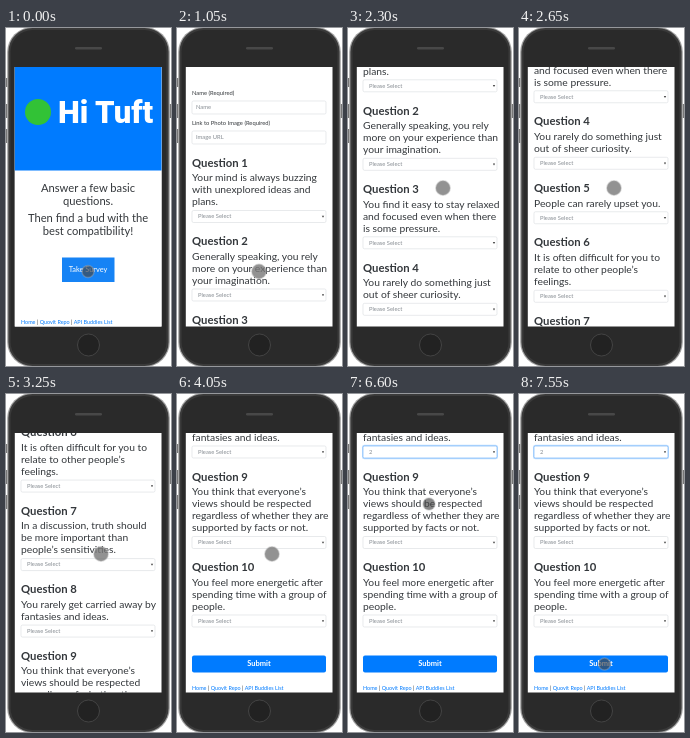
Write an HTML page that moves like this. It is 165x338 px and loops after 8000 ms.

```html
<!DOCTYPE html>
<html lang="en">
<head>
<meta charset="utf-8">
<style>
  html, body { margin: 0; width: 100%; height: 100%; overflow: hidden; background: #fff; }
  svg { display: block; width: 100vw; height: 100vh; font-family: "Lato", sans-serif; }
</style>
</head>
<body>
<svg viewBox="0 0 165 338">
  <defs>
    <clipPath id="screen"><rect x="8.8" y="39" width="146.7" height="259.5"/></clipPath>
  </defs>
  <path d="M.7 50v9M.7 76v14M.7 101v14M164.3 76v14" stroke="#777" stroke-width="1.4"/>
  <rect x="1.2" y="-1" width="162.6" height="340" rx="25" fill="#a0a0a0"/>
  <rect x="2.4" y="0" width="160.2" height="338" rx="24" fill="#3a3a3a"/>
  <rect x="4.5" y="2" width="156" height="334" rx="22" fill="#2a2a2a"/>
  <rect x="69" y="19" width="27" height="2.4" rx="1.2" fill="#484848"/>
  <circle cx="82.5" cy="317" r="11" fill="#222" stroke="#4c4c4c" stroke-width=".8"/>
  <g clip-path="url(#screen)">
    <rect x="8" y="39" width="149" height="260" fill="#fff"/>
    <g id="form"></g>
    <g id="cover"></g>
    <circle id="cursor" stroke="#aaa" stroke-opacity=".4" stroke-width="1.5"/>
  </g>
</svg>
<script>
const LOOP = 8000, BLUE = "#007bff", INK = "#34383c", GRAY = "#858b91";
const $ = id => document.getElementById(id);

const text = (x, mid, size, str, attrs = "") =>
  `<text x="${x}" y="${mid + size * .33}" font-size="${size}" fill="${INK}" ${attrs}>${str}</text>`;
const box = (y, h, attrs = "") =>
  `<rect x="15" y="${y - h / 2}" width="134" height="${h}" rx="1.5" fill="#fff" stroke="#d8dce0" stroke-width=".6" ${attrs}/>`;
const hint = `style="fill:${GRAY}"`;
const centered = 'text-anchor="middle"';
const white = centered + ' style="fill:#fff"';
const links = y => text(15, y, 5.45,
  ["Home", "Quovit Repo", "API Buddies List"]
    .map(s => `<tspan fill="${BLUE}">${s}</tspan>`).join(" | "));

const inputs = [["Name (Required)", "Name"], ["Link to Photo Image (Required)", "Image URL"]];
const questions = [
  "Your mind is always buzzing|with unexplored ideas and|plans.",
  "Generally speaking, you rely|more on your experience than|your imagination.",
  "You find it easy to stay relaxed|and focused even when there|is some pressure.",
  "You rarely do something just|out of sheer curiosity.",
  "People can rarely upset you.",
  "It is often difficult for you to|relate to other people’s|feelings.",
  "In a discussion, truth should|be more important than|people’s sensitivities.",
  "You rarely get carried away by|fantasies and ideas.",
  "You think that everyone’s|views should be respected|regardless of whether they are|supported by facts or not.",
  "You feel more energetic after|spending time with a group of|people."
];
const ANSWERED = 7;

function buildForm() {
  let out = inputs.map(([label, sample], i) =>
    text(15, 45.5 + 30 * i, 5.8, label)
    + box(59.5 + 30 * i, 13) + text(19, 59.5 + 30 * i, 5.8, sample, hint)).join("");
  let y = 115;
  questions.forEach((q, i) => {
    const lines = q.split("|"), sel = y + 17.5 + 12 * lines.length;
    const id = name => i === ANSWERED ? `id="${name}"` : "";
    out += text(15, y, 11.3, `Question ${i + 1}`, 'font-weight="700"');
    lines.forEach((s, n) => out += text(15, y + 15 + 12 * n, 10.3, s));
    if (i === ANSWERED)
      out += `<rect id="ring" x="14" y="${sel - 7.3}" width="136" height="14.6" rx="2.5" fill="#bfdeff"/>`;
    out += box(sel, 12, id("answer"))
      + text(21, sel, 5.8, "Please Select", hint + id("value"))
      + `<path d="M144.8 ${sel - .8}h2.4l-1.2 2z" fill="#444"/>`;
    y += 42.5 + 12 * lines.length;
  });
  return out + `<rect x="15" y="873.5" width="134" height="17" rx="2" fill="${BLUE}"/>`
    + text(82, 882, 7.5, "Submit", white + ' font-weight="700"') + links(906);
}

function buildCover() {
  const lead = [["Answer a few basic", "questions."], ["Then find a bud with the", "best compatibility!"]];
  return `<rect x="8" y="39" width="149" height="260" fill="#fff"/>
    <rect x="8" y="39" width="149" height="103.5" fill="${BLUE}"/>
    <circle cx="32" cy="84" r="13" fill="#32c236"/>`
    + text(99.5, 85, 31, "Hi Tuft", white + ' font-weight="800" font-family="Roboto, sans-serif"')
    + lead.map((pair, p) => pair.map((s, i) =>
        text(82, 160 + 30 * p + 13 * i, 11.2, s, centered)).join("")).join("")
    + `<rect x="56" y="229.5" width="52.5" height="24.5" fill="#1683f5"/>`
    + text(82, 242, 7.4, "Take Survey", white) + links(294);
}

const ramp = (t, start, length) => Math.min(1, Math.max(0, (t - start) / length));

// One long scroll, then four growing flicks.
function scrollAt(t) {
  let y = -20 + 252 * ramp(t, 1850, 600) ** 2.3;
  for (let k = 0; k < 4; k++) y += (80 + 10 * k) * ramp(t, 2600 + 300 * k, 165);
  return y;
}

const moves = [ // start, length, x, y
  [1350, 200, 95, 160], [4350, 250, 91, 147], [5300, 150, 104, 287],
  [5450, 200, 83, 59], [6150, 250, 81, 110], [6900, 650, 85.5, 270]
];
const pointerAt = t => moves.reduce(([x, y], [start, length, toX, toY]) => {
  const u = ramp(t, start, length);
  return [x + (toX - x) * u, y + (toY - y) * u];
}, [82, 243.5]);

const clicks = [0, 5900, 6600, 7550];

$("form").innerHTML = buildForm();
$("cover").innerHTML = buildCover();

function set(id, attrs) {
  for (const name in attrs) $(id).setAttribute(name, attrs[name]);
}

function draw() {
  const t = performance.now() % LOOP;
  const [cx, cy] = pointerAt(t);
  const tap = clicks.some(c => t >= c && t < c + 350);
  const focused = t >= 5900;
  set("form", { transform: `translate(0 ${-scrollAt(t)})` });
  set("cover", { opacity: (1 - ramp(t, 50, 1050)) ** 3 });
  set("cursor", { cx, cy, r: tap ? 6 : 7.2, fill: tap ? "#444" : "#777", "fill-opacity": tap ? .65 : .8 });
  set("ring", { opacity: focused ? 1 : 0 });
  set("answer", { stroke: focused ? "#67aef9" : "#d8dce0" });
  $("value").textContent = t >= 6600 ? "2" : "Please Select";
  requestAnimationFrame(draw);
}
draw();
</script>
</body>
</html>
```
